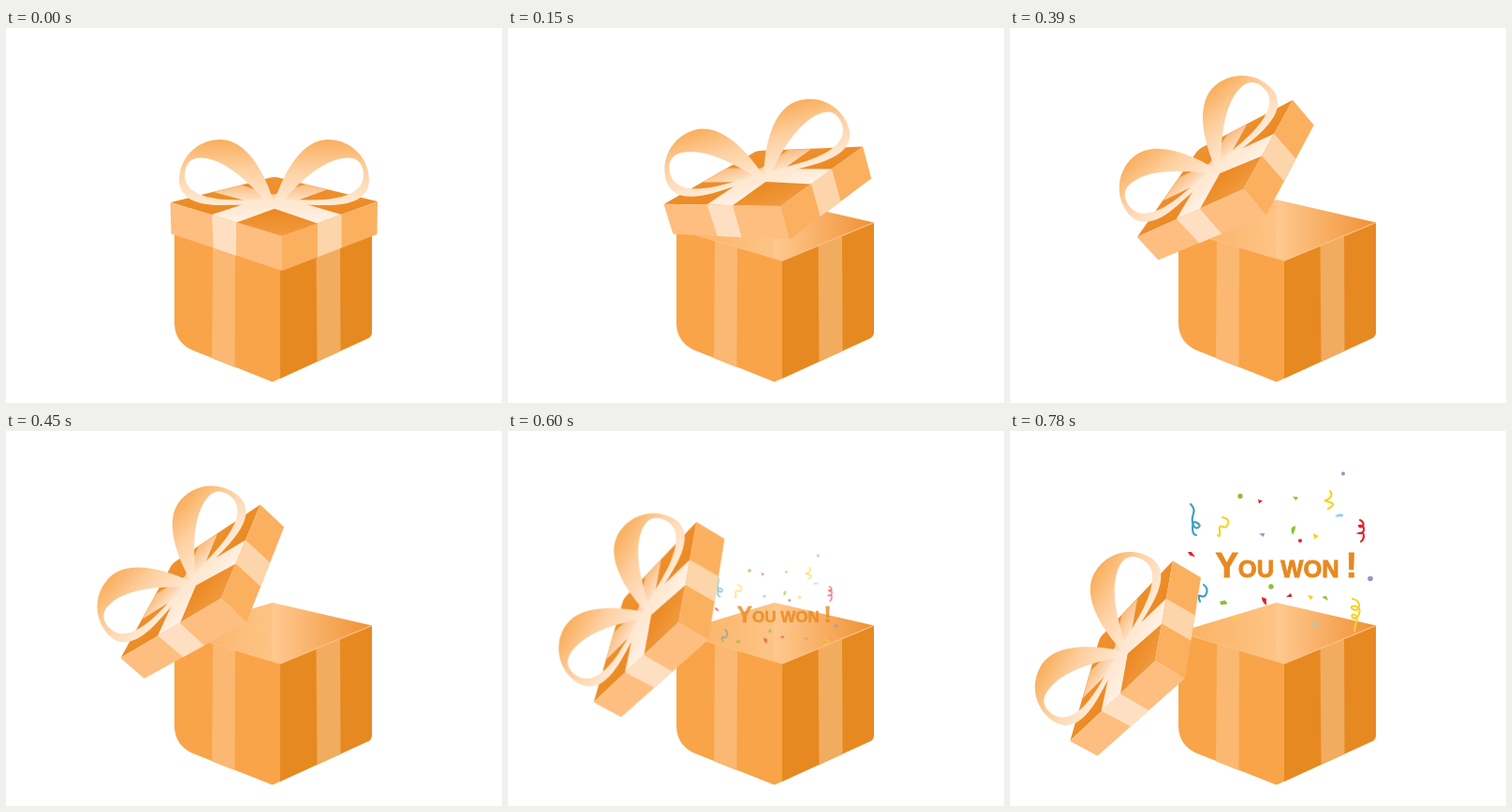
Animation, 530 px wide and 400 px high, one loop 910 ms. Source, as an HTML page:

```html
<!DOCTYPE html>
<html lang="en">
<head>
<meta charset="utf-8">
<title>Gift box</title>
<style>
  html, body { margin: 0; width: 100%; height: 100%; overflow: hidden; background: #fff; }
  svg { display: block; width: 100vw; height: 100vh; }

  .lid {
    transform-origin: 177.5px 220px;
    animation: tip 910ms infinite, slide 910ms infinite;
  }
  .msg, .confetti { animation: grow 910ms infinite, show 910ms infinite; }
  .msg {
    transform-origin: 295px 301px;
    font: bold 36.5px "Liberation Sans", Arial, sans-serif;
    fill: #e8891f; stroke: #e8891f; stroke-width: .9;
  }
  .msg tspan { font-size: 25.55px; }
  .confetti { transform-origin: 282px 308px; animation-name: grow, pop; }

  /* one step every 30 ms, then a 130 ms hold */
  @keyframes tip {
    0% { rotate: 0deg; animation-timing-function: steps(19); }
    62.637%, 100% { rotate: -60deg; }
  }
  @keyframes slide {
    0% { translate: 0 0; animation-timing-function: steps(1); }
    32.967% { translate: -1.8px 2.8px; animation-timing-function: steps(15); }
    82.418% { translate: -82.5px 125.5px; animation-timing-function: steps(1); }
    85.714%, 100% { translate: -83px 126px; }
  }
  @keyframes grow {
    0%, 39.56% { scale: 0; animation-timing-function: steps(12); }
    79.121%, 100% { scale: 1; }
  }
  @keyframes show {
    0%, 39.56% { opacity: 0; animation-timing-function: steps(10); }
    72.527%, 100% { opacity: 1; }
  }
  @keyframes pop {
    0%, 59.341% { opacity: 0; animation-timing-function: steps(3); }
    69.231%, 100% { opacity: 1; }
  }

  .g { fill: #8dbe35; } .r { fill: #e2242b; } .y { fill: #f5d327; }
  .p { fill: #9a92c6; } .c { fill: #8fd6e0; }
  .curl { fill: none; stroke-width: 2.1; stroke-linecap: round; }
  .sb { stroke: #3f9fc2; } .sy { stroke: #f5d327; } .sr { stroke: #e2242b; }
</style>
</head>
<body>
<svg viewBox="0 0 530 400">
  <defs>
    <linearGradient id="wallL" x1="0" x2="1">
      <stop offset="0" stop-color="#fab060"/><stop offset="1" stop-color="#fdc486"/>
    </linearGradient>
    <linearGradient id="wallR" x1="0" x2="1">
      <stop offset="0" stop-color="#ffc990"/><stop offset="1" stop-color="#ef9134"/>
    </linearGradient>
    <linearGradient id="top" gradientUnits="userSpaceOnUse" x1="0" y1="159" x2="0" y2="222">
      <stop offset="0" stop-color="#ee922f"/><stop offset=".6" stop-color="#ec8a25"/><stop offset="1" stop-color="#f19b40"/>
    </linearGradient>
    <linearGradient id="band" gradientUnits="userSpaceOnUse" x1="0" y1="166" x2="0" y2="206">
      <stop offset="0" stop-color="#f9b878"/><stop offset=".5" stop-color="#fee6ce"/><stop offset="1" stop-color="#fff2e5"/>
    </linearGradient>
    <linearGradient id="bow" gradientUnits="userSpaceOnUse" x1="0" y1="119" x2="0" y2="188">
      <stop offset="0" stop-color="#f9ae5c"/><stop offset=".45" stop-color="#fdcf9f"/><stop offset="1" stop-color="#ffead5"/>
    </linearGradient>
    <path id="loop" fill="url(#bow)" fill-rule="evenodd" d="M287 188C276 152 256 119 229 119C203 119 185 140 185 162C185 183 206 189 230 189C252 189 270 188 287 188Z
      M276 183C257 162 232 139 208 138.500C196 138 191 147 191 157C191 175 212 181.500 234 183C250 184 264 183 276 183Z"/>
  </defs>

  <path fill="url(#wallL)" d="M180 214.500L285 183V246L180 217Z"/>
  <path fill="url(#wallR)" d="M284.500 183L391 207.500L293 248.500L284.500 246Z"/>

  <text class="msg" x="219.5" y="155.5" xml:space="preserve">Y<tspan>OU WON </tspan>!</text>
  <g class="confetti">
    <circle class="g" cx="246" cy="69.500" r="2.7"/>
    <circle class="p" cx="356" cy="45.500" r="2"/>
    <circle class="p" cx="385" cy="157.500" r="2.8"/>
    <circle class="g" cx="279" cy="166" r="2.7"/>
    <circle class="r" cx="310" cy="117" r="2"/>
    <circle class="y" cx="240" cy="199.500" r="2.2"/>
    <circle class="c" cx="327" cy="206" r="2.2"/>
    <path class="r" d="M265 73l5 1.500l-4 3zM190 129l4 0l4 5.500l-6-2zM269 177l5 2l0 7q-5-3-5-9zM295 177l5-4l1.500 4z"/>
    <path class="g" d="M302 70l6 .5l-2.500 3.500zM301 103l4-2q0 6-3 9.500q-2-3-1-7.500zM224 182l6-1.500l2.500 4l-7 1zM333 177l5-1l2 5z"/>
    <path class="y" d="M324 109l6 3l-5 3.500zM318 175l6 1l-2.500 4.500z"/>
    <path class="p" d="M266 109.500l6-.5l-1 4z"/>
    <path class="c" d="M347 91q4-4 9-2v2q-5 1-9 0z"/>
    <path class="curl sb" d="M193 78q5 5 3 10t-1 10q2 7 6 5t-1-5t-5 5t4 8"/>
    <path class="curl sb" d="M207 164q5 4 3 9t-6 3t-1 6"/>
    <path class="curl sy" d="M227 92q8 2 6 7t-6 3t-3 5t-2 4"/>
    <path class="curl sy" d="M342 64q3 4 0 7t-5 3t5 2t-2 7"/>
    <path class="curl sr" d="M374 95q5 2 3 7q-4 1-4-1q6-1 5 5q-1 4-5 3q5-2 5 3q0 4-3 6"/>
    <path class="curl sy" d="M366 179q8 2 7 8t-7 3q-3-4 3-3t4 8t-7 4q-2-4 2-3t2 8t-2 9"/>
  </g>

  <path fill="#f9a448" d="M180 214.500L293.500 248.500V373.500L287 376.500Q284 378 281 376L200 344Q181 336 180 316Z"/>
  <path fill="#e78921" d="M293 248.500L391 207.500V325Q391 329 386 331.500L293 374Z"/>
  <path fill="#fab872" d="M221 227L245 234L244.500 362L220 352.300Z"/>
  <path fill="#f2ac5f" d="M331.500 232.500L357 222L357.500 344.500L332.500 356Z"/>
  <path fill="none" stroke="#fdc184" stroke-width="1.2" d="M180 214.500L293 248L391 207.500"/>

  <g class="lid">
    <path fill="url(#top)" d="M176 186L281 160Q287 158 293 160L397 185L295 222Z"/>
    <path fill="url(#band)" d="M220 199L320 166.500L343 172.500L287 192.800L246 207.500Z"/>
    <path fill="url(#band)" d="M222 175L251 167.500L358.500 199L333 208.500L287 192.800Z"/>
    <path fill="#fdbe80" d="M175.500 186L295 222V259L176.500 219.500Z"/>
    <path fill="#fbb060" d="M295 222L397 185L396.500 220L295 259Z"/>
    <path fill="#fedfc1" d="M220 199.300L246 207.200V242.700L221.500 234.500Z"/>
    <path fill="#fdd5aa" d="M333 208.200L358.500 199V234.500L333 244.300Z"/>
    <use href="#loop"/>
    <use href="#loop" transform="matrix(-1 0 0 1 573 0)"/>
  </g>
</svg>
</body>
</html>
```
